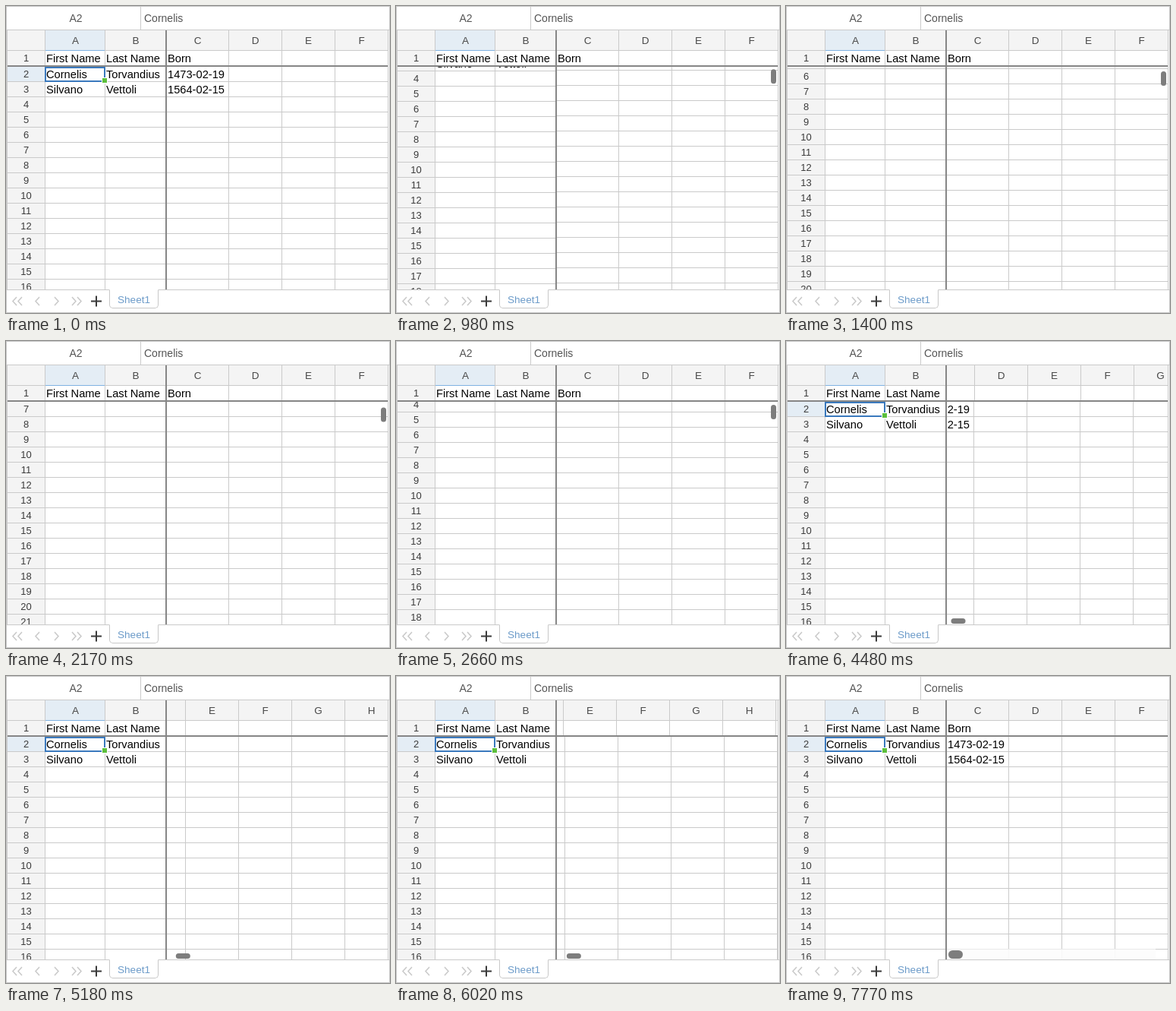
Recreate the animation shown at these times as an HTML page. Size 506x404 px, loop 7980 ms.

```html
<!DOCTYPE html>
<html lang="en">
<head>
<meta charset="utf-8">
<title>Spreadsheet with frozen panes</title>
<style>
html, body { margin: 0; width: 100%; height: 100%; overflow: hidden; background: #fff; }
#stage {
  position: relative; width: 506px; height: 404px; overflow: hidden; background: #fff;
  font: 14.667px "Liberation Sans", Arial, sans-serif; color: #000;
}
#stage div, svg { position: absolute; box-sizing: border-box; }
.pane { overflow: hidden; }
.line { background: #cacaca; }
.freeze { background: #868686; }
.head { background: #f4f4f4; }
.on { background: #e4edf5; }
.blue { background: #7fb2e2; }
.text { white-space: pre; }
.label { font-size: 13px; color: #3c3c3c; text-align: center; }
.col { font-size: 13.5px; color: #4a4a4a; }
.bar { font-size: 14px; color: #555; }
.pick { border: 2px solid #3a79bd; }
.grip { background: #5cbf3c; border: 1px solid #fff; }
.frame { border: 1px solid #c6c6c6; }
.tab {
  border: 1px solid #c8c8c8; border-top-color: #fff; border-radius: 0 0 5px 5px;
  background: #fff; color: #6c9bc9; font-size: 13.6px; text-align: center;
}
.track { background: rgba(252, 252, 252, .9); border-top: 1px solid #e9e9e9; }
.thumb { background: #7d7d7d; border-radius: 6px; }
svg { left: 0; top: 374px; fill: none; }
</style>
</head>
<body>
<div id="stage"></div>
<script>
const stage = document.getElementById('stage');
const LOOP = 7980, TICK = 70, LAST_ROW = 24;
const colEdges = [211, 293, 363, 433, 503, 573, 643, 713];
const people = [
  ['Cornelis', 'Torvandius', '1473-02-19'],
  ['Silvano', 'Vettoli', '1564-02-15']
];

function box(parent, cls, x, y, w, h, text) {
  const el = document.createElement('div');
  el.className = cls;
  el.style.cssText = `left:${x}px;top:${y}px;width:${w}px;height:${h}px`;
  if (text !== undefined) {
    el.textContent = text;
    el.style.lineHeight = h + 'px';
  }
  parent.append(el);
  return el;
}

// A clipped pane whose content is placed in stage coordinates.
function pane(x, y, w, h) {
  return box(box(stage, 'pane', x, y, w, h), '', -x, -y, 800, 600);
}

const rowTop = k => k === 1 ? 59 : 40 + 20 * k;
const cell = (parent, x, k, text) => box(parent, 'text', x + 2, rowTop(k), 90, 20, text);

// Formula bar
box(stage, 'text label bar', 2, 6, 180, 21, 'A2');
box(stage, 'text bar', 182, 6, 200, 21, people[0][0]);
box(stage, 'line', 177, 1, 1, 30);
box(stage, 'line', 1, 31, 504, 1);

// Frozen corner
const corner = pane(2, 32, 209, 47);
box(corner, 'head', 2, 32, 209, 27);
box(corner, 'head', 2, 59, 49, 20);
box(corner, 'on', 52, 32, 78, 27);
box(corner, 'line', 2, 58, 209, 1);
box(corner, 'blue', 51, 58, 80, 1);
for (const x of [51, 130]) box(corner, 'line', x, 32, 1, 47);
box(corner, 'text label col', 52, 32, 79, 27, 'A');
box(corner, 'text label col', 131, 32, 80, 27, 'B');
box(corner, 'text label', 2, 59, 49, 20, '1');
cell(corner, 51, 1, 'First Name');
cell(corner, 130, 1, 'Last Name');

// Column headers and first row, scrolling sideways
const top_ = pane(211, 32, 293, 47);
box(top_, 'head', 211, 32, 580, 27);
box(top_, 'line', 211, 58, 580, 1);
colEdges.slice(1).forEach((x, i) => {
  const left = colEdges[i];
  box(top_, 'line', x, 32, 1, 47);
  box(top_, 'text label col', left, 32, x - left + 1, 27, 'CDEFGHI'[i]);
});
cell(top_, 211, 1, 'Born');

// Row headers and columns A and B, scrolling up and down
const side = pane(2, 79, 209, 295);
box(side, 'head', 2, 79, 49, 500);
box(side, 'on', 2, 80, 49, 19);
for (const x of [51, 130]) box(side, 'line', x, 79, 1, 500);

const main = pane(211, 79, 293, 295);
for (const x of colEdges.slice(1)) box(main, 'line', x, 79, 1, 500);

for (let k = 2; k <= LAST_ROW; k++) {
  const y = rowTop(k);
  box(side, 'line', 2, y + 19, 209, 1);
  box(side, 'text label', 2, y, 49, 20, k);
  box(main, 'line', 211, y + 19, 580, 1);
}
people.forEach(([first, last, born], i) => {
  cell(side, 51, i + 2, first);
  cell(side, 130, i + 2, last);
  cell(main, 211, i + 2, born);
});
box(side, 'pick', 51, 80, 80, 20);
box(side, 'grip', 126, 94, 8, 8);

// Freeze lines and outer frame
box(stage, 'freeze', 2, 78, 502, 2);
box(stage, 'freeze', 210, 32, 2, 342);
box(stage, 'line', 503, 32, 1, 342);
box(stage, 'line', 1, 32, 1, 342);
box(stage, 'line', 1, 373, 504, 1);
box(stage, 'frame', 0, 0, 506, 404);

// Sheet bar
box(stage, 'text tab', 136, 373, 65, 25, 'Sheet1');
stage.insertAdjacentHTML('beforeend', `
<svg width="136" height="29">
  <path stroke="#c9c9c9" stroke-width="1.5"
    d="M14 9l-5 5.5 5 5.5M21 9l-5 5.5 5 5.5M44 9l-5 5.5 5 5.5
       M64 9l5 5.5-5 5.5M87 9l5 5.5-5 5.5M94 9l5 5.5-5 5.5"/>
  <path stroke="#3a3a3a" stroke-width="2" d="M112 14.5h14M119 7.5v14"/>
</svg>`);

// Scrollbars
const thumbY = box(stage, 'thumb', 494, 81, 7, 19);
const thumbX = box(stage, 'thumb', 214, 365, 19, 7);
const hoverBar = box(stage, '', 212, 359, 275, 14);
box(hoverBar, 'track', 0, 0, 275, 14);
box(hoverBar, 'thumb', 2, 2, 19, 11);

// Piecewise linear track of [time, value] points
function at(t, keys) {
  const i = keys.findIndex(k => k[0] > t);
  if (i < 0) return keys[keys.length - 1][1];
  if (i === 0) return keys[0][1];
  const [t0, a] = keys[i - 1], [t1, b] = keys[i];
  return a + (b - a) * (t - t0) / (t1 - t0);
}
const trip = (go, there, back, home, far) => [[go, 0], [there, far], [back, far], [home, 0]];

// The frozen panes trail the main pane slightly.
const mainY = trip(630, 1680, 2125, 3080, 105);
const sideY = trip(642, 1680, 2125, 3080, 105);
const mainX = trip(4088, 5600, 5828, 6790, 176);
const topX = trip(4100, 5600, 5845, 6790, 176);
const showY = [[699, 0], [700, 1], [3570, 1], [3850, 0]];
const showX = [[4129, 0], [4130, 1], [7280, 1], [7490, 0]];
const showHover = [[7560, 0], [7770, 1]];

const move = (el, x, y) => { el.style.transform = `translate(${x}px,${y}px)`; };
const start = performance.now();

function draw() {
  const now = Math.max(0, performance.now() - start) % LOOP;
  const t = Math.floor(now / TICK) * TICK;
  const pos = keys => Math.round(at(t, keys));
  move(main, -pos(mainX), -pos(mainY));
  move(side, 0, -pos(sideY));
  move(top_, -pos(topX), 0);
  move(thumbY, 0, at(t, mainY) * .065);
  move(thumbX, at(t, mainX) * .077, 0);
  thumbY.style.opacity = at(t, showY);
  thumbX.style.opacity = at(t, showX);
  hoverBar.style.opacity = at(t, showHover);
  requestAnimationFrame(draw);
}
draw();
</script>
</body>
</html>
```
